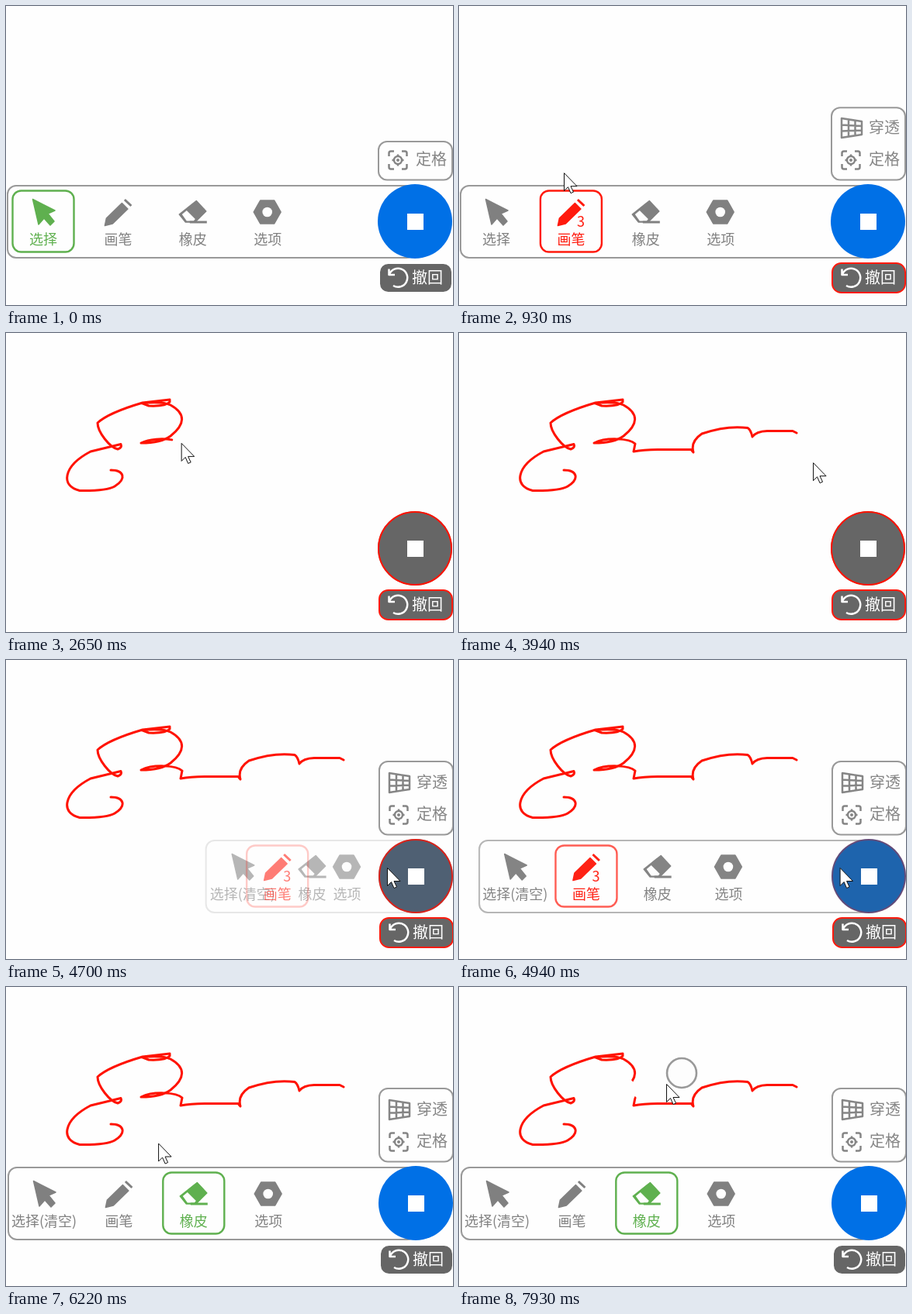
Animation, 576 px wide and 386 px high, one loop 8000 ms. Source, as an HTML page:

```html
<!DOCTYPE html>
<html lang="zh-CN">
<head>
<meta charset="utf-8">
<title>画板</title>
<style>
  html, body { margin: 0; width: 100%; height: 100%; overflow: hidden; background: #fefefe; }
  svg { display: block; font-family: "Noto Sans CJK SC", "Noto Sans CJK", sans-serif; font-weight: 350; }
  .line { fill: none; stroke: currentColor; stroke-width: 2.5; stroke-linejoin: round; }
  .bar { stroke-width: 3; }
  .solid { fill: currentColor; stroke: currentColor; stroke-width: 1.5; stroke-linejoin: round; }
  .item text { font-size: 18px; text-anchor: middle; fill: currentColor; }
  .side { font-size: 20px; fill: currentColor; }
  .frame { fill: none; stroke: #999; stroke-width: 2; }
  #panel { color: #858585; }
  #undo { color: #fff; }
</style>
</head>
<body>
<svg width="576" height="386" viewBox="0 0 576 386">
  <defs>
    <mask id="kept" maskUnits="userSpaceOnUse" x="0" y="0" width="576" height="386">
      <rect width="576" height="386" fill="#fff"/>
      <line id="wipe" x1="182" y1="136" y2="134" stroke="#000" stroke-width="38" stroke-linecap="round"/>
    </mask>
  </defs>
  <g mask="url(#kept)">
    <path id="ink" fill="none" stroke="#ff1200" stroke-width="3" stroke-linecap="round" stroke-linejoin="round"
      d="M135 177C152 177 156 188 140 198Q130 204 95 203.5C70 198 73 172 109 153L148 143.5Q150 148 144 150
         C134 148 118 128 118 116Q132 103 176 90L211 86V89Q206 95 184 94L175 90.5Q202 88 212 93
         C232 104 231 118 212 133Q200 142 174 142C190 134 220 136 227 143L225 153Q240 150 264 150.5H299L302 154
         Q298 140 313 130Q345 119 372 122.5Q376 125 378 134Q383 127 397 126.5H430L435 129"/>
  </g>
  <g id="ui">
    <g id="panel">
      <rect id="panelBox" class="frame" x="480" width="95" rx="11"/>
      <g id="through">
        <path class="line" d="M493 145L519 149V166L493 170ZM502 146.5V168.5M510.5 148V167M493 153.5L519 155M493 161.5L519 160.5"/>
        <text class="side" x="528" y="163.5">穿透</text>
      </g>
      <path class="line" d="M493.5 194V190Q493.5 187.5 496 187.5H500M510 187.5H514Q516.5 187.5 516.5 190V194M516.5 204V208Q516.5 210.5 514 210.5H510M500 210.5H496Q493.5 210.5 493.5 208V204"/>
      <path class="line" d="M505 191.5V194M505 204V206.5M497.5 199H500M510 199H512.5"/>
      <circle class="line" cx="505" cy="199" r="5"/>
      <circle cx="505" cy="199" r="2" fill="currentColor"/>
      <text class="side" x="528" y="205">定格</text>
    </g>
    <g id="menu">
      <rect id="menuBox" class="frame" y="232" height="93" rx="11"/>
      <g class="item" id="select">
        <path class="solid" d="M-13.5 249.5L15 264 6 268 14 278 9 283 1 274-6 282Z"/>
        <text id="selectLabel" y="308"></text>
      </g>
      <g class="item" id="pen">
        <path class="solid" d="M-17 283.5L-15 274 5 254.5 12.5 262-7 281Z"/>
        <path class="line bar" d="M8.5 250L17 258"/>
        <text id="penSize" x="12.5" y="285">3</text>
        <text y="308">画笔</text>
      </g>
      <g class="item" id="eraser">
        <path class="solid" d="M-17.5 269L4.5 251.5 17 265 3 279H-9.5Z"/>
        <path fill="#fefefe" d="M-14 269L-8 264 3 275 1 277.5H-8Z"/>
        <path class="line bar" d="M-4 279H18"/>
        <text y="308">橡皮</text>
      </g>
      <g class="item" id="options">
        <path class="solid" d="M-18 266L-9.5 251H8.5L17 266 8.5 281H-9.5Z"/>
        <circle cx="-.5" cy="266" r="6.3" fill="#fefefe"/>
        <text y="308">选项</text>
      </g>
      <rect id="marker" y="238.5" width="79" height="79" rx="11" fill="none" stroke-width="2.4"/>
    </g>
    <circle id="ball" cx="527" cy="278" r="48"/>
    <circle id="ring" cx="527" cy="278" r="47" fill="none" stroke="#ff1200" stroke-width="2"/>
    <rect x="517" y="268" width="21" height="21" fill="#fff"/>
    <g id="undo">
      <rect id="undoBox" x="481" y="332" width="94" height="38" rx="11.5" fill="#666" stroke-width="2"/>
      <path class="line" d="M493.5 339.5V347H501M494 346.5A12 12 0 1 1 499 361"/>
      <text class="side" x="523" y="357.5">撤回</text>
    </g>
  </g>
  <circle id="rubber" r="19" fill="#fefefe" fill-opacity=".5" stroke="#999" stroke-width="2.6"/>
  <path id="cursor" d="M.5 .5V23.5L5.5 18.5 9 26.5 12.5 25 9 17.5H17Z" fill="#fff" stroke="#111"/>
</svg>
<script>
const LOOP = 8000, ENTER = 120, PEN_CLICK = 690, DRAW = 1410, DRAW_TIME = 1790, INK_LAG = 30;
const FOLD = 1355, UNFOLD = 4590, FOLD_TIME = 500, ERASER_CLICK = 5640, RUB = 7490;
const GREEN = '#5fb04f', RED = '#ff1a0d', GRAY = '#808080', PAPER = '#fefefe';
const ITEMS = ['select', 'pen', 'eraser', 'options'];

// pointer moves: start, end, x, y
const ARRIVE = [[ENTER, 440, 135, 273], [PEN_CLICK, 1090, 135, 177]];
const LEAVE = [
  [3900, 3940, 456, 167], [3940, 4580, 491, 268], [4940, 5580, 222, 262],
  [5800, 6580, 174, 150], [RUB, 7530, 162, 150], [7530, 7930, 267, 125]
];

const $ = id => document.getElementById(id);
const set = (id, attrs) => { for (const k in attrs) $(id).setAttribute(k, attrs[k]); };
const show = (id, on) => set(id, { visibility: on ? 'visible' : 'hidden' });
const clamp = v => Math.min(1, Math.max(0, v));
const progress = (t, from, time) => clamp((t - from) / time);
const easeOut = (p, power) => 1 - (1 - p) ** power;
const inkLength = $('ink').getTotalLength();

function travel(from, moves, t) {
  return moves.reduce((at, [start, end, ...to]) => {
    const p = progress(t, start, end - start);
    return at.map((v, i) => v + (to[i] - v) * p);
  }, from);
}

function drawnLength(t) {
  return inkLength * progress(t, DRAW, DRAW_TIME);
}

function drawInk(t) {
  set('ink', { 'stroke-dasharray': `${drawnLength(t - INK_LAG)} ${inkLength}` });
  show('ink', t > DRAW + INK_LAG);
}

function drawPointer(t) {
  const pen = $('ink').getPointAtLength(drawnLength(t));
  const [x, y] = t < DRAW ? travel([-8, 72], ARRIVE, t) : travel([pen.x, pen.y], LEAVE, t);
  set('cursor', { transform: `translate(${x} ${y})` });
  set('rubber', { cx: x + 20, cy: y - 14 });
  set('wipe', { x2: Math.min(x + 20, 209) });
  show('cursor', t >= ENTER);
  show('rubber', t >= RUB);
  show('wipe', t >= RUB);
}

function drawMenu(t, mode) {
  const folding = t >= FOLD && t < UNFOLD;
  const closed = progress(t, FOLD, FOLD_TIME), opened = progress(t, UNFOLD, FOLD_TIME);
  const shown = t < UNFOLD ? 1 - closed : opened;
  const spread = t < UNFOLD ? 1 - easeOut(closed, 2.5) : easeOut(opened, 2.5);
  const left = 478 - 477 * spread;
  const itemX = id => 527 - (479 - 96.4 * ITEMS.indexOf(id)) * spread;
  const accent = mode === 'pen' ? RED : GREEN;

  show('menu', shown > 0);
  set('menuBox', { x: left + 1, width: 526 - left, opacity: shown });
  for (const id of ITEMS) {
    set(id, {
      transform: `translate(${itemX(id)})`,
      opacity: spread ** 0.75,
      color: id === mode ? accent : GRAY
    });
  }
  set('marker', { x: itemX(mode) - 39.5, stroke: accent, opacity: shown });
  show('penSize', mode === 'pen' && shown > 0);
  $('selectLabel').textContent = t < FOLD ? '选择' : '选择(清空)';

  // translucent black turns into solid blue
  const alpha = 0.6 + 0.4 * shown;
  const ball = [0, 112, 230].map(c => Math.round(255 * (1 - alpha) + c * shown * alpha));
  set('ball', { fill: `rgb(${ball})` });
  set('ring', { opacity: mode === 'pen' ? 1 - shown : 0 });

  const grow = easeOut(progress(t, PEN_CLICK, 350), 3);
  const top = 175 - 45 * grow;
  set('panel', { display: folding ? 'none' : 'inline' });
  set('panelBox', { y: top, height: 224.5 - top });
  set('through', { opacity: grow });
}

function draw(t) {
  const mode = t < PEN_CLICK ? 'select' : t < ERASER_CLICK ? 'pen' : 'eraser';
  drawInk(t);
  drawMenu(t, mode);
  drawPointer(t);
  set('undoBox', { stroke: mode === 'pen' ? RED : PAPER });
  set('ui', { transform: t < UNFOLD ? '' : 'translate(1 1)' });
}

const start = performance.now();
(function frame() {
  draw((performance.now() - start) % LOOP);
  requestAnimationFrame(frame);
})();
</script>
</body>
</html>
```
